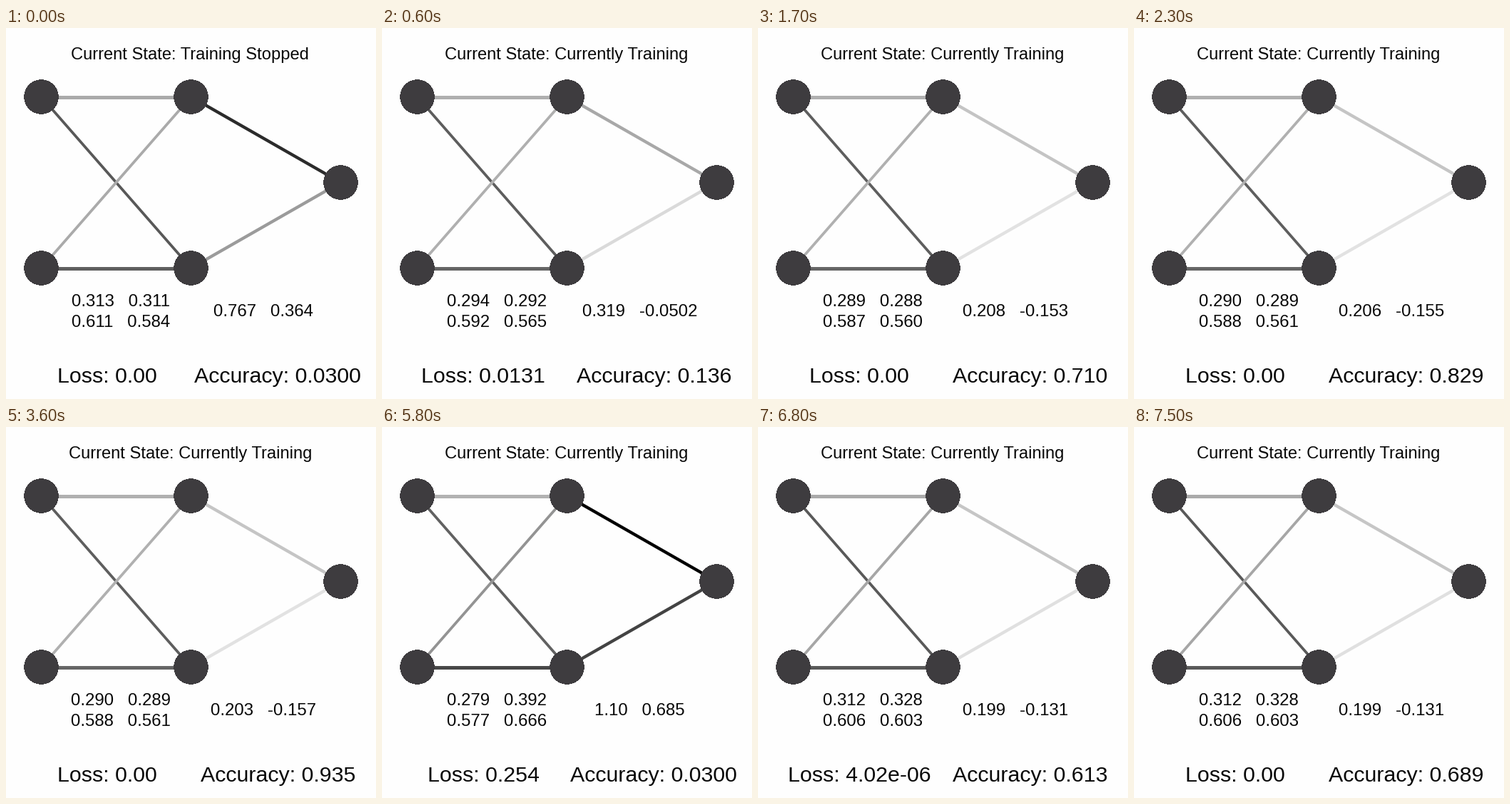
Recreate the animation shown at these times as a matplotlib script. Size 519x520 px, loop 8000 ms.

```python
import numpy as np
import matplotlib.pyplot as plt
from matplotlib.animation import FuncAnimation
from matplotlib.patches import Circle

W, H, DPI = 519, 520, 64
PX = 72 / DPI            # points per pixel
FRAMES, STEP_MS = 80, 100

NODES = [(49, 96), (49, 336), (259, 96), (259, 336), (469, 216)]
# Edges in weight order: the 2x2 hidden matrix, then the output pair
EDGES = [(0, 2), (1, 2), (0, 3), (1, 3), (2, 4), (3, 4)]
DRAW_ORDER = [2, 0, 3, 1, 4, 5]

# Frames at which the network takes a training step
STEPS = [*range(5, 12), 16, 20, 22, 28, 31, 35, *range(58, 69), 74]

IDLE = (0.313, 0.311, 0.611, 0.584, 0.767, 0.364)
FIT_A = (0.2888, 0.2878, 0.587, 0.560, 0.210, -0.151)
FIT_B = (0.290, 0.289, 0.588, 0.561, 0.206, -0.155)
FIT_C = (0.290, 0.289, 0.588, 0.561, 0.203, -0.157)
RESET = (0.279, 0.392, 0.577, 0.666, 1.10, 0.685)
FIT_D = (0.312, 0.328, 0.606, 0.603, 0.203, -0.128)
FIT_E = (0.312, 0.328, 0.606, 0.603, 0.199, -0.131)

# start frame, end frame, start weights, end weights, error ratio per step
SEGMENTS = [
    (4, 10, IDLE, FIT_A, 0.45),
    (10, 22, FIT_A, FIT_B, 1),
    (22, 31, FIT_B, FIT_C, 1),
    (58, 64, RESET, FIT_D, 0.42),
    (64, 68, FIT_D, FIT_E, 1),
]


def weights_at(step):
    for t0, t1, a, b, ratio in reversed(SEGMENTS):
        if step >= t0:
            k, n = min(step, t1) - t0, t1 - t0
            u = k / n if ratio == 1 else (1 - ratio**k) / (1 - ratio**n)
            return np.array(a) * (1 - u) + np.array(b) * u
    return np.array(IDLE)


def loss_at(frame):
    if frame not in STEPS:
        return 0.0
    if frame < 58:
        keys, vals = [5, 10, 35], [0.0731, 1.35e-5, 2.37e-6]
    else:
        keys, vals = [58, 64, 74], [0.254, 6.12e-6, 2.14e-6]
    return np.exp(np.interp(frame, keys, np.log(vals)))


def accuracy_at(step):
    if step < 58:
        return np.interp(step, [5, 10, 11, 22, 35],
                         [0.03, 0.559, 0.61, 0.829, 0.935])
    return np.interp(step, [60, 64, 66, 68, 74],
                     [0.03, 0.198, 0.493, 0.613, 0.689])


def gray(w):
    level = np.interp(w, [-0.15, 0.2, 0.313, 0.364, 0.611, 0.767, 1],
                      [226, 198, 170, 155, 88, 43, 0])
    return (level / 255,) * 3


def num(v):
    return f"{v:#.3g}"


def pair(a, b):
    return f"{num(a)}   {num(b)}"


fig = plt.figure(figsize=(W / DPI, H / DPI), dpi=DPI, facecolor="#fefefe")
ax = fig.add_axes([0, 0, 1, 1])
ax.set_xlim(0, W)
ax.set_ylim(H, 0)
ax.axis("off")


def add_edge(index):
    (x0, y0), (x1, y1) = (NODES[n] for n in EDGES[index])
    dx, dy = abs(x1 - x0), abs(y1 - y0)
    width = 5 * max(dx, dy) / np.hypot(dx, dy)   # 5 px along the minor axis
    return ax.plot([x0 + 0.5, x1 + 0.5], [y0 + 0.5, y1 + 0.5],
                   lw=width * PX, zorder=1 + DRAW_ORDER.index(index))[0]


def add_text(x, baseline, size):
    return ax.text(x, baseline, "", family="Liberation Sans", color="#080808",
                   size=size * PX, ha="center", va="baseline")


edges = [add_edge(i) for i in range(len(EDGES))]
for x, y in NODES:
    ax.add_patch(Circle((x + 0.5, y + 0.5), 23.7, fc="#3e3c3f", ec="none",
                        antialiased=False, zorder=10))

title = add_text(258.3, 44, 23.8)
row_top = add_text(161, 390, 24)
row_low = add_text(161, 419, 24)
row_out = add_text(361.3, 404, 24)
loss = add_text(142, 497, 30.4)
accuracy = add_text(381.3, 497, 30.4)


def update(frame):
    step = max((s for s in STEPS if s <= frame), default=0)
    w = weights_at(step)
    for line, value in zip(edges, w):
        line.set_color(gray(value))
    state = "Currently Training" if step else "Training Stopped"
    title.set_text(f"Current State: {state}")
    row_top.set_text(pair(w[0], w[1]))
    row_low.set_text(pair(w[2], w[3]))
    row_out.set_text(pair(w[4], w[5]))
    loss.set_text(f"Loss: {num(loss_at(frame))}")
    accuracy.set_text(f"Accuracy: {num(accuracy_at(step))}")
    return [*edges, title, row_top, row_low, row_out, loss, accuracy]


anim = FuncAnimation(fig, update, frames=FRAMES, interval=STEP_MS,
                     repeat=True, repeat_delay=0)
plt.show()
```
